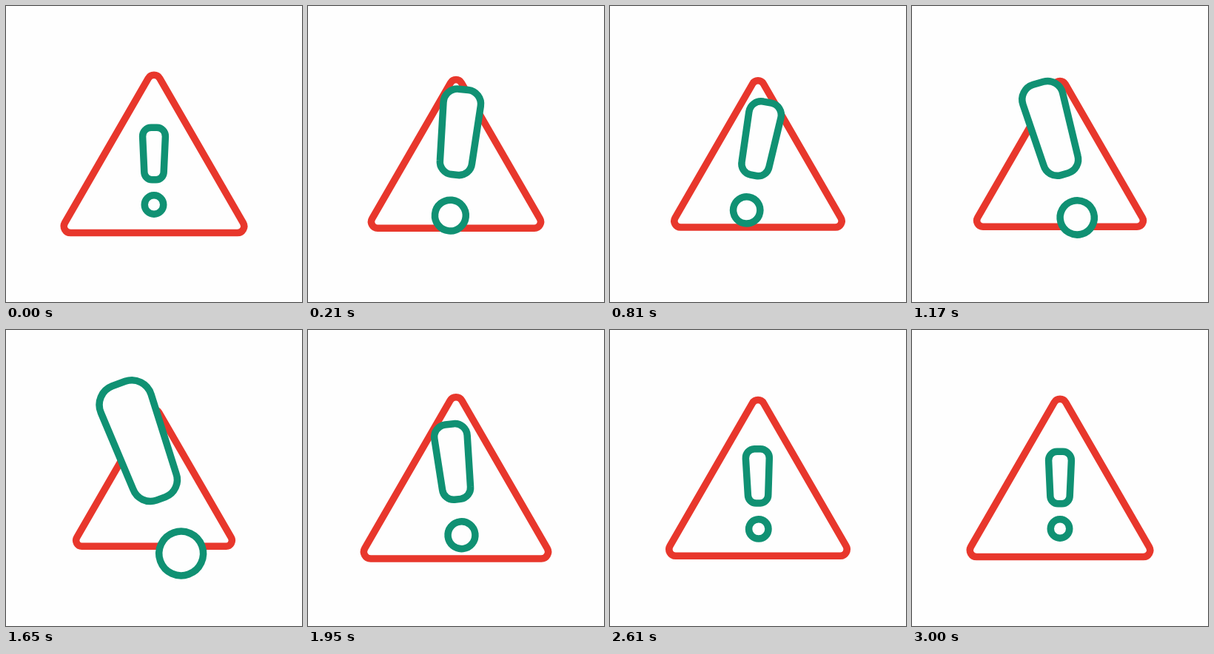
Write an HTML page that moves like this. It is 400x400 px and loops after 5.03 s.

```html
<!DOCTYPE html>
<html lang="en">
<head>
<meta charset="utf-8">
<title>Warning sign</title>
<style>
  html, body { margin: 0; width: 100%; height: 100%; overflow: hidden; background: #fefefe; }
  svg { display: block; width: 100%; height: 100%; }
  #sign { fill: none; stroke: #e8372c; }
  #mark { fill: #fefefe; stroke: #109173; }
</style>
</head>
<body>
<svg viewBox="0 0 400 400">
  <!-- both shapes are drawn around their own pivot -->
  <path id="sign" d="M-112.7 106.5H112.7A9 9 0 0 0 120.5 93L7.8 -102.2A9 9 0 0 0 -7.8 -102.2L-120.5 93A9 9 0 0 0 -112.7 106.5Z"/>
  <g id="mark">
    <path d="M-4 -59.8H4A11.6 11.6 0 0 1 15.4 -47.6L13.2 .2A10.6 10.6 0 0 1 2.8 10.8H-2.8A10.6 10.6 0 0 1 -13.2 .2L-15.4 -47.6A11.6 11.6 0 0 1 -4 -59.8Z"/>
    <circle cy="44.5" r="12.75"/>
  </g>
</svg>
<script>
const LOOP = 5030, MOVE = 3000, STEP = 30, LINE = 9.5;
const sign = document.getElementById('sign');
const mark = document.getElementById('mark');

// Swings from one turning point [time, value] to the next with a sine ease
const swing = (...points) => t => {
  const next = Math.max(1, points.findIndex(([time]) => time >= t));
  const [t0, from] = points[next - 1], [t1, to] = points[next];
  return from + (to - from) * (1 - Math.cos(Math.PI * (t - t0) / (t1 - t0))) / 2;
};

const signScale = swing([0, 1], [460, .863], [950, .945], [1600, .861], [2210, 1.125], [2650, .985], [MOVE, 1]);
const markScale = swing([0, 1], [440, 2.38], [850, 1.4], [1570, 2.4], [2220, .89], [2650, 1.04], [MOVE, 1]);
const markTurn = swing([0, 0], [570, 20], [1330, -20.4], [1640, -20.2], [2220, 5], [2650, -1], [MOVE, 0]);
const markX = swing([0, 200], [420, 200], [810, 196.6], [1170, 200.8], [MOVE, 200]);

// The mark rises as it grows, so that the dot stays near the base line
const markY = scale => 189.3 + 34.7 / Math.max(1, scale);

function place(node, x, y, turn, scale) {
  node.setAttribute('transform', `translate(${x} ${y}) rotate(${turn}) scale(${scale})`);
  node.setAttribute('stroke-width', LINE / scale);
}

function draw() {
  const elapsed = performance.now() % LOOP;
  const t = Math.min(MOVE, Math.floor(elapsed / STEP) * STEP);
  const scale = markScale(t);
  place(sign, 200, 200, 0, signScale(t));
  place(mark, markX(t), markY(scale), markTurn(t), scale);
  requestAnimationFrame(draw);
}
draw();
</script>
</body>
</html>
```
